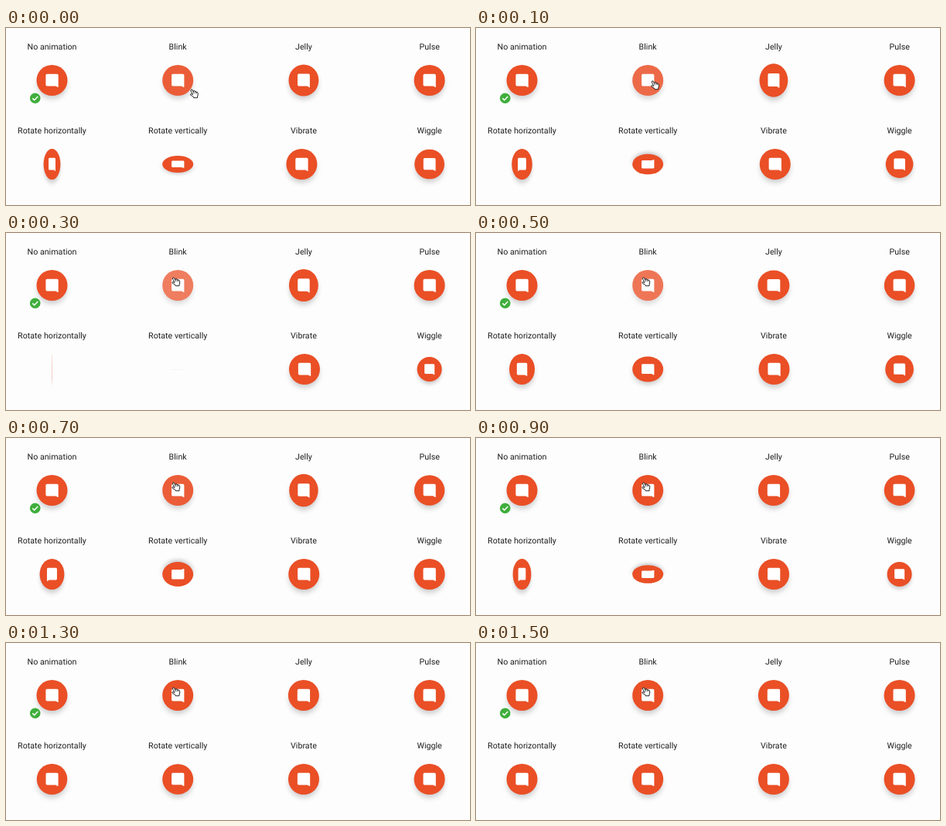
Write an HTML page that moves like this. It is 600x230 px and loops after 1.6 s.

```html
<!DOCTYPE html>
<html lang="en">
<head>
<meta charset="utf-8">
<title>Button animations</title>
<style>
  html, body { margin: 0; width: 100%; height: 100%; overflow: hidden; background: #fdfdfe; }
  svg { display: block; }
  text {
    font-family: Roboto, sans-serif; font-size: 10.7px; fill: #1f1f1f;
    text-anchor: middle; text-rendering: geometricPrecision;
  }
</style>
</head>
<body>
<svg id="stage" width="600" height="230" viewBox="0 0 600 230">
  <defs>
    <filter id="soft" x="-50%" y="-50%" width="200%" height="200%">
      <feGaussianBlur stdDeviation="3.6"/>
    </filter>
    <g id="button">
      <circle cy="5" r="19" opacity=".2" filter="url(#soft)"/>
      <circle r="20" fill="#ea4f26"/>
      <path fill="#fff" d="M-6.4-8.3H6.5Q8.2-8.3 8.2-6.6V8.3Q8.2 9.4 7.2 8.8L4.7 7.4H-6.4Q-8.1 7.4-8.1 5.7V-6.6Q-8.1-8.3-6.4-8.3Z"/>
    </g>
  </defs>
  <g id="grid"></g>
  <circle cx="37.7" cy="91.2" r="6.8" fill="#3fae3c"/>
  <path d="M34.3 91.4l2.4 2.4 4.5-4.7" fill="none" stroke="#fff" stroke-width="1.5"/>
  <g id="hand" stroke="#111" stroke-width=".9" stroke-linejoin="round" stroke-linecap="round">
    <path fill="#fff" d="M.7 1.6Q1.2-.2 2.6.9L4.1 4Q5-.1 6.2 3.4Q7.4 2.7 8 4Q9.4 3.6 9.8 5.2
      Q10.4 8 9.2 9.8V11.5H4.4V10.4L.5 8Q-.6 6.5 1.1 6.4L2.9 7.1Z"/>
    <path fill="none" stroke-width=".7" d="M4.1 4l.6 1.8M6.2 3.4l.5 2M8 4l.3 1.6"/>
  </g>
</svg>
<script>
const STEP = 100, LOOP = 1600;
const grid = document.getElementById('grid');
const hand = document.getElementById('hand');
const names = ['No animation', 'Blink', 'Jelly', 'Pulse',
  'Rotate horizontally', 'Rotate vertically', 'Vibrate', 'Wiggle'];

const [, blink, jelly, pulse, flipX, flipY, vibrate, wiggle] = names.map((name, i) => {
  const x = 59.5 + (i % 4) * 162.7;
  const y = 68 + (i > 3 ? 109 : 0);
  grid.insertAdjacentHTML('beforeend', `<g transform="translate(${x} ${y})">
    <text y="-40">${name}</text><use href="#button"/></g>`);
  return grid.lastElementChild.lastElementChild;
});

const clamp = v => Math.min(1, Math.max(0, v));
// Smooth bump from 0 to 1 and back between two times.
const bump = (t, from, to) => Math.sin(Math.PI * clamp((t - from) / (to - from))) ** 2;
const scale = (el, x, y = x) => el.setAttribute('transform', `scale(${x} ${y})`);
const move = (el, x, y) => el.setAttribute('transform', `translate(${x} ${y})`);

function draw(t) {
  blink.setAttribute('opacity', 1 - .27 * bump(t, -220, 920));

  const wobble = .035 + .06 * Math.cos(2 * Math.PI * (t - 170) / 640);
  const squeeze = wobble * clamp((900 - t) / 150);
  scale(jelly, 1 - squeeze, 1 + squeeze);
  scale(pulse, 1 - .015 * bump(t, 200, 1100));

  // The last part of two full turns, slowing to rest.
  const angle = 720 - 663 * clamp(1 - t / 1400) ** 1.61;
  const turn = Math.cos(angle * Math.PI / 180);
  scale(flipX, turn, 1);
  scale(flipY, 1, turn);

  move(vibrate, -2.5 * Math.exp(-t / 350) * Math.cos(2 * Math.PI * t / 200), 0);
  scale(wiggle, 1 - .2 * (bump(t, -100, 670) + bump(t, 690, 1120)));

  const away = clamp(1 - t / 200);
  move(hand, 214.8 + 23.5 * away, 57.2 + 22 * away);
}

const start = performance.now();
function tick() {
  const t = (performance.now() - start) % LOOP;
  draw(Math.floor(t / STEP) * STEP);
  requestAnimationFrame(tick);
}
tick();
</script>
</body>
</html>
```
